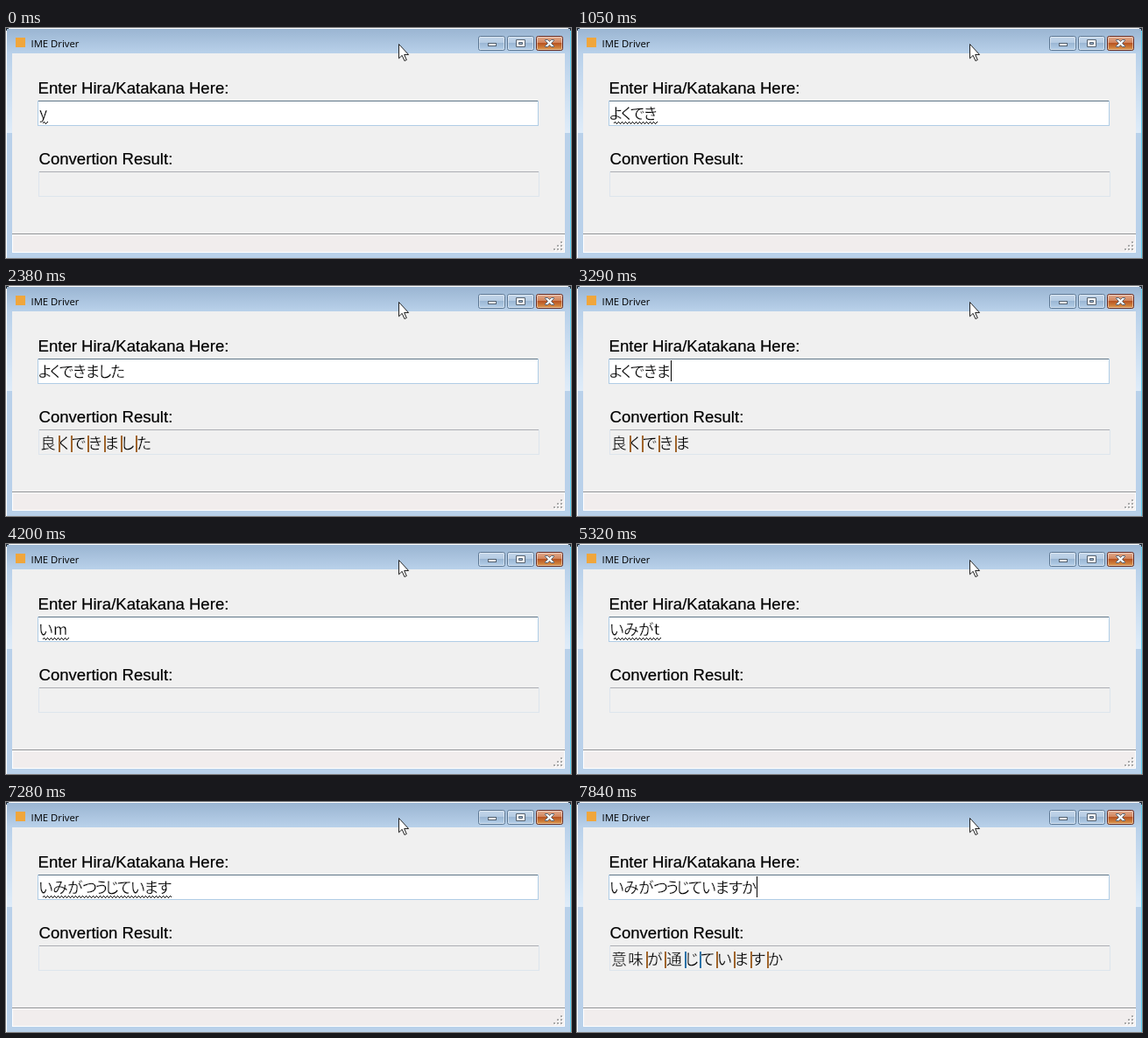
These frames come from a looping animation (645x263 px, 8000 ms). An HTML page:

```html
<!DOCTYPE html>
<html lang="en">
<head>
<meta charset="utf-8">
<title>IME Driver</title>
<style>
  html, body { margin: 0; width: 100%; height: 100%; overflow: hidden; background: #b9d1ea; }
  svg { display: block; width: 645px; height: 263px; }
  .crisp { shape-rendering: crispEdges; }
  .title { font: 11.3px "Open Sans", "Noto Sans", sans-serif; }
  .label { font: 18.58px "Liberation Sans", Arial, sans-serif; stroke: #000; stroke-width: .2px; }
  /* A background-coloured outline thins the strokes. */
  .kana { font: 300 17.5px "Noto Sans CJK JP", "Noto Sans CJK", sans-serif; text-anchor: middle; stroke-width: .3px; }
  #input { stroke: #fff; }
  #result { stroke: #f0f0f0; }
</style>
</head>
<body>
<svg viewBox="0 0 645 263" lang="ja">
  <defs>
    <linearGradient id="bar" x2="0" y2="1">
      <stop stop-color="#99b4d1"/><stop offset="1" stop-color="#b9d1ea"/>
    </linearGradient>
    <linearGradient id="side" x2="0" y2="1">
      <stop stop-color="#b9d1ea"/><stop offset="1" stop-color="#dfecf9"/>
    </linearGradient>
    <linearGradient id="glass" x2="0" y2="1">
      <stop stop-color="#c5d7ea"/><stop offset=".48" stop-color="#b3cae2"/>
      <stop offset=".5" stop-color="#9bb7d4"/><stop offset="1" stop-color="#b5cfe9"/>
    </linearGradient>
    <linearGradient id="red" x2="0" y2="1">
      <stop stop-color="#e3ad92"/><stop offset=".48" stop-color="#d08258"/>
      <stop offset=".5" stop-color="#b85422"/><stop offset="1" stop-color="#dc9a4c"/>
    </linearGradient>
  </defs>

  <g class="crisp">
    <path fill="#b9d1ea" d="M0 0h645v263H0z"/>
    <path fill="url(#bar)" d="M0 0h645v29H0z"/>
    <path fill="url(#side)" d="M0 29h645v91H0z"/>
    <path fill="#fff" d="M0 0h645v1H1v262H0z"/>
    <path fill="#5fd3f3" d="M644 1h1v262h-1z"/>
    <path fill="#222c36" d="M0 0h3v1H1v2H0zM645 0h-3v1h2v2h1z"/>
    <path fill="#f0f0f0" d="M7 29h631v228H7z"/>
    <path fill="#8f9194" d="M7 235h631v1H7z"/>
    <path fill="#fff" d="M7 236h631v21H7z"/>
    <path fill="#f1eded" d="M8 237h629v19H8z"/>
    <path class="grip" fill="#fff" transform="translate(1 1)"/>
    <path class="grip" fill="#aaa"/>
    <path fill="#f0a63c" d="M11 11h11v11H11z"/>
  </g>
  <text class="title" x="28.5" y="22">IME Driver</text>

  <g stroke="#5d7894">
    <rect x="539.5" y="9.5" width="30" height="16" rx="2" fill="url(#glass)"/>
    <rect x="572.5" y="9.5" width="30" height="16" rx="2" fill="url(#glass)"/>
    <rect x="605.5" y="9.5" width="30" height="16" rx="2" fill="url(#red)" stroke="#682c22"/>
  </g>
  <g fill="none" stroke="#fff" stroke-opacity=".45">
    <rect x="540.5" y="10.5" width="28" height="14" rx="1"/>
    <rect x="573.5" y="10.5" width="28" height="14" rx="1"/>
    <rect x="606.5" y="10.5" width="28" height="14" rx="1"/>
  </g>
  <g fill="#fff" stroke="#53606f">
    <rect x="550.5" y="17.5" width="9" height="3"/>
    <path fill-rule="evenodd" d="M582.5 13.5h10v8h-10zM585.5 16.5h4v2h-4z"/>
    <path d="M615.5 13.5h3l2 2 2-2h3v1l-3 3 3 3v1h-3l-2-2-2 2h-3v-1l3-3-3-3z"/>
  </g>

  <text class="label" x="36.5" y="75">Enter Hira/Katakana Here:</text>
  <text class="label" x="37.5" y="156">Convertion Result:</text>

  <g class="crisp">
    <path fill="#b0cde6" d="M36 83h572v29H36z"/>
    <path fill="#fff" d="M37 84h570v27H37z"/>
    <path fill="#5f7688" d="M37 83h570v1H37z"/>
    <path fill="#dde5ed" d="M37 164h572v29H37z"/>
    <path fill="#f0f0f0" d="M38 165h570v27H38z"/>
    <path fill="#abadb3" d="M38 164h570v1H38z"/>
    <path id="wave" fill="none" stroke="#000"/>
    <rect id="caret" y="85"/>
    <path id="brown" fill="#a0642a"/>
    <path id="blue" fill="#2a72a8"/>
  </g>
  <text class="kana" id="input" y="104"></text>
  <text class="kana" id="result" y="185.5"></text>

  <path fill="#fff" stroke="#222" d="M448.5 18.5v16.3l3.7-3.5 2.7 6.2 2.4-1-2.7-6h5z"/>
</svg>
<script>
const LOOP = 8000, INPUT_X = 38, RESULT_X = 39;
const $ = id => document.getElementById(id);

// Advance widths of the proportional face; anything else is a full-width kanji.
const advance = {
  よ: 14, く: 10, で: 15, き: 15, ま: 15, し: 13, た: 16,
  い: 16, み: 17, が: 17, つ: 16, う: 11, じ: 13, て: 15, す: 15, か: 16,
  y: 10, k: 10, m: 17, g: 10, t: 7, z: 9, s: 9, '|': 4, ':': 4
};
const KANJI = 19;

// [time, input, caret visible, conversion]; "|" and ":" are brown and blue dividers.
const steps = [
  [0, 'y'], [70, 'よ'], [140, 'よk'], [210, 'よく'], [350, 'よくで'],
  [420, 'よくでk'], [560, 'よくでk', 1], [910, 'よくでk'], [1050, 'よくでき'],
  [1190, 'よくできm'], [1260, 'よくできま'], [1400, 'よくできまs'],
  [1470, 'よくできまし'], [1610, 'よくできましt'], [1680, 'よくできました'],
  [1820, 'よくできました', 1],
  [1960, 'よくできました', 1, '良|く|で|き|ま|し|た'],
  [2380, 'よくできました', 0, '良|く|で|き|ま|し|た'],
  [2870, 'よくできまし', 1, '良|く|で|き|ま|し'],
  [3290, 'よくできま', 1, '良|く|で|き|ま'],
  [3360, 'よくで', 1, '良|く|で'], [3430, '', 1],
  [3920, 'い'], [4200, 'いm'], [4270, 'いみ'], [4410, 'いみg'],
  [4480, 'いみが'], [4900, 'いみが', 1], [5250, 'いみが'],
  [5320, 'いみがt'], [5390, 'いみがつ'], [5460, 'いみがつう'],
  [5530, 'いみがつうz'], [5600, 'いみがつうじ'], [5810, 'いみがつうじ', 1],
  [6090, 'いみがつうじて'], [6300, 'いみがつうじて', 1], [6790, 'いみがつうじて'],
  [6860, 'いみがつうじてい'], [7000, 'いみがつうじていm'],
  [7070, 'いみがつうじていま'], [7210, 'いみがつうじていまs'],
  [7280, 'いみがつうじています'], [7420, 'いみがつうじていますk'],
  [7490, 'いみがつうじていますか'], [7770, 'いみがつうじていますか', 1],
  [7840, 'いみがつうじていますか', 1, '意味|が|通:じ:て|い|ま|す|か']
];

function layout(text, x) {
  const cells = [...text].map(char => {
    const width = advance[char] || KANJI;
    const cell = { char, x, middle: x + width / 2 - 0.5 };
    x += width;
    return cell;
  });
  return { cells, end: x };
}

function setText(id, cells) {
  $(id).setAttribute('x', cells.map(c => c.middle).join(' '));
  $(id).textContent = cells.map(c => c.char).join('');
}

function setDividers(id, cells, mark) {
  const bars = cells.filter(c => c.char === mark);
  $(id).setAttribute('d', bars.map(c => `M${c.x + 2} 171h2v19h-2z`).join(''));
}

function wavePath(end) {
  let d = 'M41.5 109.5';
  for (let x = 43.5, up = true; x <= end + 1; x += 2, up = !up) d += `L${x} ${up ? 107.5 : 109.5}`;
  return d;
}

function show([, input, caretOn, result = '']) {
  const typed = layout(input, INPUT_X);
  const { cells } = layout(result, RESULT_X);
  const composing = input && !result;
  setText('input', typed.cells);
  setText('result', cells.filter(c => !'|:'.includes(c.char)));
  setDividers('brown', cells, '|');
  setDividers('blue', cells, ':');
  $('wave').setAttribute('d', composing ? wavePath(typed.end) : '');
  const caret = $('caret');
  caret.setAttribute('x', Math.max(39, typed.end));
  caret.setAttribute('width', caretOn ? (composing ? 2 : 1) : 0);
  caret.setAttribute('height', composing ? 26 : 24);
}

let grip = '';
for (let row = 0; row < 3; row++)
  for (let col = 2 - row; col < 3; col++) grip += `M${625 + col * 4} ${244 + row * 4}h2v2h-2z`;
document.querySelectorAll('.grip').forEach(path => path.setAttribute('d', grip));

let current;
const start = performance.now();
function tick() {
  const time = (performance.now() - start) % LOOP;
  const step = steps.findLast(s => s[0] <= time) || steps[0];
  if (step !== current) show(current = step);
  requestAnimationFrame(tick);
}
tick();
</script>
</body>
</html>
```
